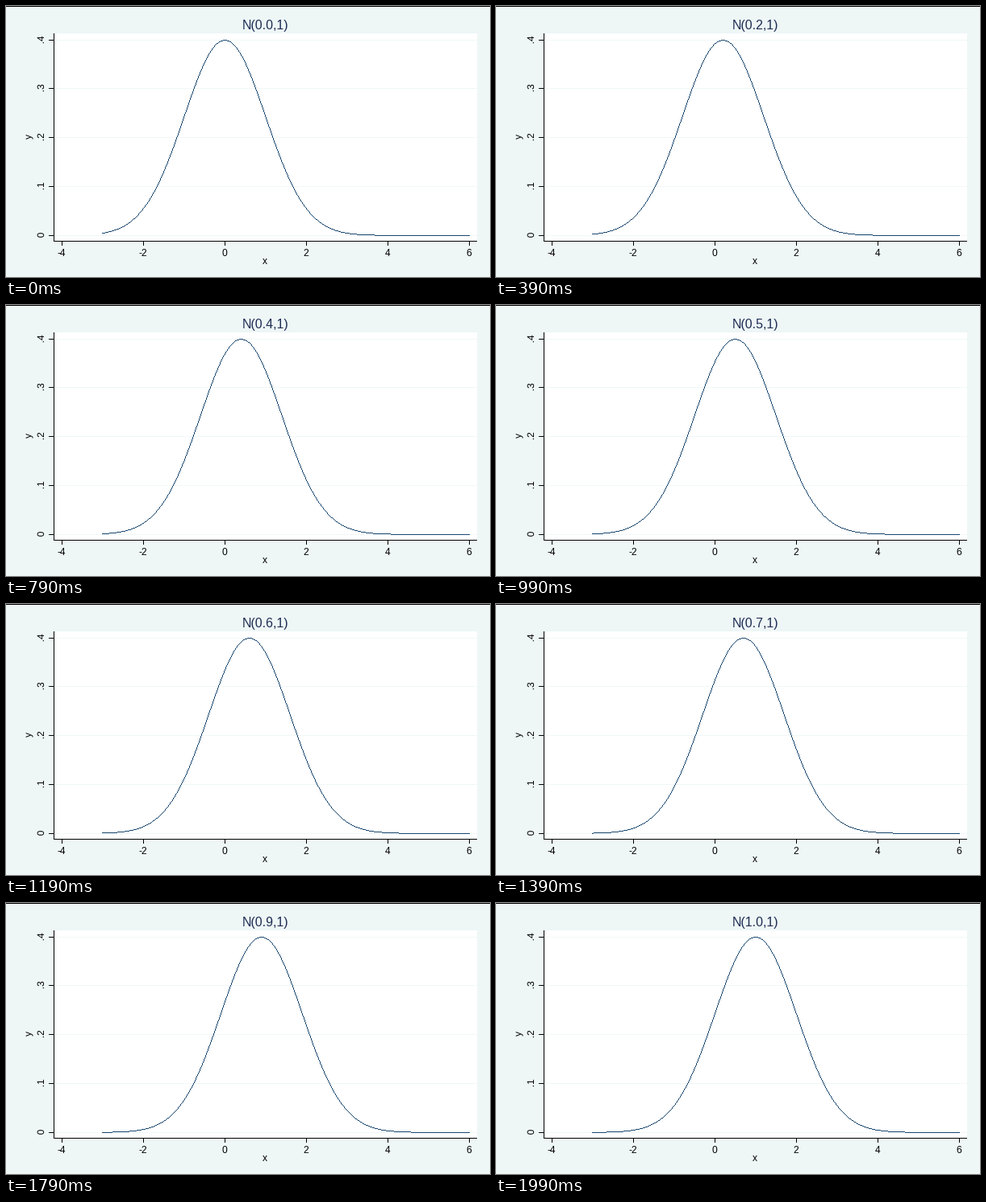
A matplotlib script for the animation above (2.19 s loop, 600x337 px).

```python
import numpy as np
import matplotlib.pyplot as plt
from matplotlib.animation import FuncAnimation
from matplotlib.patches import PathPatch, Rectangle
from matplotlib.path import Path
from matplotlib.textpath import TextPath

W, H, DPI = 600, 337, 100
PT = 72 / DPI
TICK_MS, LOOP_MS = 10, 2190
FIRST_MS, STEP_MS = 190, 200

BACK, NAVY, TITLE = "#eef6f6", "#1a476f", "#1e2d53"
plt.rcParams["font.family"] = "Liberation Sans"

fig = plt.figure(figsize=(W / DPI, H / DPI), dpi=DPI, facecolor=BACK)
ax = fig.add_axes([0, 0, 1, 1])
ax.axis("off")


def px(x):
    return 271.4 + 50.5 * x


def py(y):
    return 285.3 - 608 * y


def box(x, y, w, h, color):
    ax.add_patch(Rectangle((x, y), w, h, fc=color, lw=0, antialiased=False))


def label(x, y, text, size=12, color="black"):
    return ax.text(x, y, text, fontsize=size * PT, color=color,
                   ha="center", va="baseline")


def turned_label(x, y, text, size=12):
    """Text reading upwards, baseline at x, centred on y."""
    glyphs = TextPath((0, 0), text, size=size)
    ext = glyphs.get_extents()
    along, up = glyphs.vertices.T
    verts = np.column_stack([x - up, y + (ext.x0 + ext.x1) / 2 - along])
    ax.add_patch(PathPatch(Path(verts, glyphs.codes), fc="black", lw=0))


box(0, 0, W, 1, "black")
box(60, 34, 524, 258, "white")

for i in range(5):
    row = int(py(i / 10))
    box(60, row, 524, 1, "#f0f7f7")
    box(53, row, 6, 1, "black")
    turned_label(47, row, f".{i}" if i else "0")

for x in range(-4, 7, 2):
    col = int(px(x))
    box(col, 293, 1, 5, "black")
    label(col, 311, str(x))

box(59, 34, 1, 259, "black")
box(59, 292, 525, 1, "black")
label(321, 321, "x")
turned_label(31, 163, "y")
title = label(321.5, 29, "", 16, TITLE)

# The curve is a hard one-pixel line: one run of whole pixels per column.
edges = np.arange(int(px(-3)), int(px(6)) + 2)
xs = (edges - px(0)) / (px(1) - px(0))


def pixel_runs(mean):
    y = py(np.exp(-(xs - mean) ** 2 / 2) / np.sqrt(2 * np.pi))
    top = np.floor(np.minimum(y[:-1], y[1:]))
    bottom = np.floor(np.maximum(y[:-1], y[1:]))
    return top, np.maximum(bottom, top + 1)


top, bottom = pixel_runs(0)
curve = ax.stairs(bottom, edges, baseline=top, fill=True, color=NAVY,
                  lw=0, antialiased=False, snap=True)
ax.set_xlim(0, W)
ax.set_ylim(H, 0)


def update(i):
    ms = i * TICK_MS
    step = 0 if ms < FIRST_MS else 1 + (ms - FIRST_MS) // STEP_MS
    mean = step / 10
    top, bottom = pixel_runs(mean)
    curve.set_data(bottom, edges, top)
    title.set_text(f"N({mean:.1f},1)")
    return curve, title


anim = FuncAnimation(fig, update, frames=LOOP_MS // TICK_MS,
                     interval=TICK_MS, repeat=True, repeat_delay=0)
plt.show()
```
